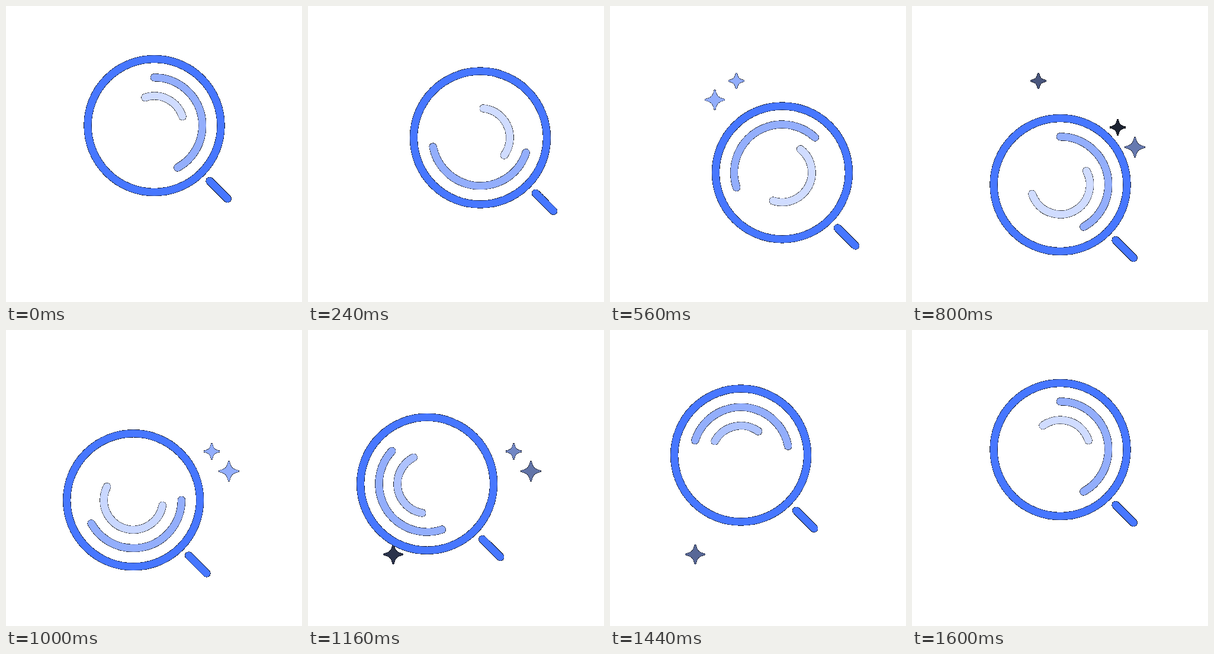
These frames come from a looping animation (500 px wide and 500 px high, 1640 ms). An HTML page with a canvas:

```html
<!DOCTYPE html>
<html lang="en">
<head>
<meta charset="utf-8">
<title>Searching</title>
<style>
  html, body { margin: 0; width: 100%; height: 100%; overflow: hidden; background: #fff; }
  canvas { display: block; width: 500px; height: 500px; }
</style>
</head>
<body>
<canvas width="500" height="500"></canvas>
<script>
const ctx = document.querySelector('canvas').getContext('2d', { willReadFrequently: true });
const STEP = 40, LOOP = 1640, TURN = 1600;
const BLUE = [71, 119, 255], SOFT = [147, 174, 252], PALE = [208, 220, 255];

// x, y, half size, then the fade-in and fade-out intervals in ms
const stars = [
  [177, 158.5, 17, 280, 480, 560, 760],
  [213.5, 126.5, 13.5, 340, 540, 700, 900],
  [376.5, 238.5, 17, 660, 860, 1100, 1280],
  [347.5, 205, 13.5, 760, 960, 1120, 1300],
  [144, 379, 17, 1100, 1300, 1360, 1560],
];

const ramp = (t, from, to) => Math.min(1, Math.max(0, (t - from) / (to - from)));
const mix = (a, b, k) => a.map((v, i) => v + (b[i] - v) * k);
const rgb = c => `rgb(${c.map(Math.round)})`;

function stroke(color, width = 12.5) {
  ctx.strokeStyle = rgb(color);
  ctx.lineWidth = width;
  ctx.stroke();
}

// Degrees run clockwise from the top.
function arc(radius, from, to, color) {
  const rad = deg => (deg - 90) * Math.PI / 180;
  ctx.beginPath();
  ctx.arc(0, 0, radius, rad(from), rad(to));
  stroke(color);
}

function star(x, y, size, light) {
  const color = mix([0, 0, 0], SOFT, light), r = size - 1;
  ctx.save();
  ctx.translate(x, y);
  ctx.beginPath();
  ctx.moveTo(0, -r);
  for (let i = 0; i < 4; i++) {
    ctx.bezierCurveTo(r * .19, -r * .3, r * .3, -r * .19, r, 0);
    ctx.rotate(Math.PI / 2);
  }
  ctx.closePath();
  ctx.fillStyle = rgb(color);
  ctx.fill();
  stroke(color, 2);
  ctx.restore();
}

function magnifier(t) {
  const turn = t / TURN * 360, angle = turn * Math.PI / 180;
  const grow = ramp(t, 0, 960), shrink = ramp(t, 960, 1320), regrow = ramp(t, 1320, TURN);
  const head = 72 + turn, span = 90 + 120 * (grow - shrink) + 18 * regrow;
  ctx.save();
  ctx.translate(250.5 + 50 * Math.sin(angle), 252 - 50 * Math.cos(angle));
  arc(112.5, 0, 360, BLUE);
  arc(81.25, 2 * turn, 2 * turn + 151, SOFT);
  arc(50, head - span, head, mix(PALE, SOFT, shrink - regrow));
  ctx.beginPath();
  ctx.moveTo(93.6, 93.6);
  ctx.lineTo(123.7, 123.7);
  stroke(BLUE);
  ctx.restore();
}

// Soft edge pixels become opaque against black, giving a thin dark outline.
function darkenEdges() {
  const image = ctx.getImageData(0, 0, 500, 500), px = image.data;
  for (let i = 0; i < px.length; i += 4) {
    const alpha = px[i + 3];
    if (alpha === 0 || alpha === 255) continue;
    for (let c = i; c < i + 3; c++) px[c] *= alpha / 255;
    px[i + 3] = 255;
  }
  ctx.putImageData(image, 0, 0);
}

let shown = -1;
function draw() {
  const t = Math.floor(performance.now() % LOOP / STEP) * STEP;
  if (t !== shown) {
    shown = t;
    ctx.clearRect(0, 0, 500, 500);
    for (const [x, y, size, in0, in1, out0, out1] of stars) {
      const light = ramp(t, in0, in1) - ramp(t, out0, out1);
      if (light > 0) star(x, y, size, light);
    }
    magnifier(t);
    darkenEdges();
  }
  requestAnimationFrame(draw);
}

ctx.lineCap = ctx.lineJoin = 'round';
draw();
</script>
</body>
</html>
```
